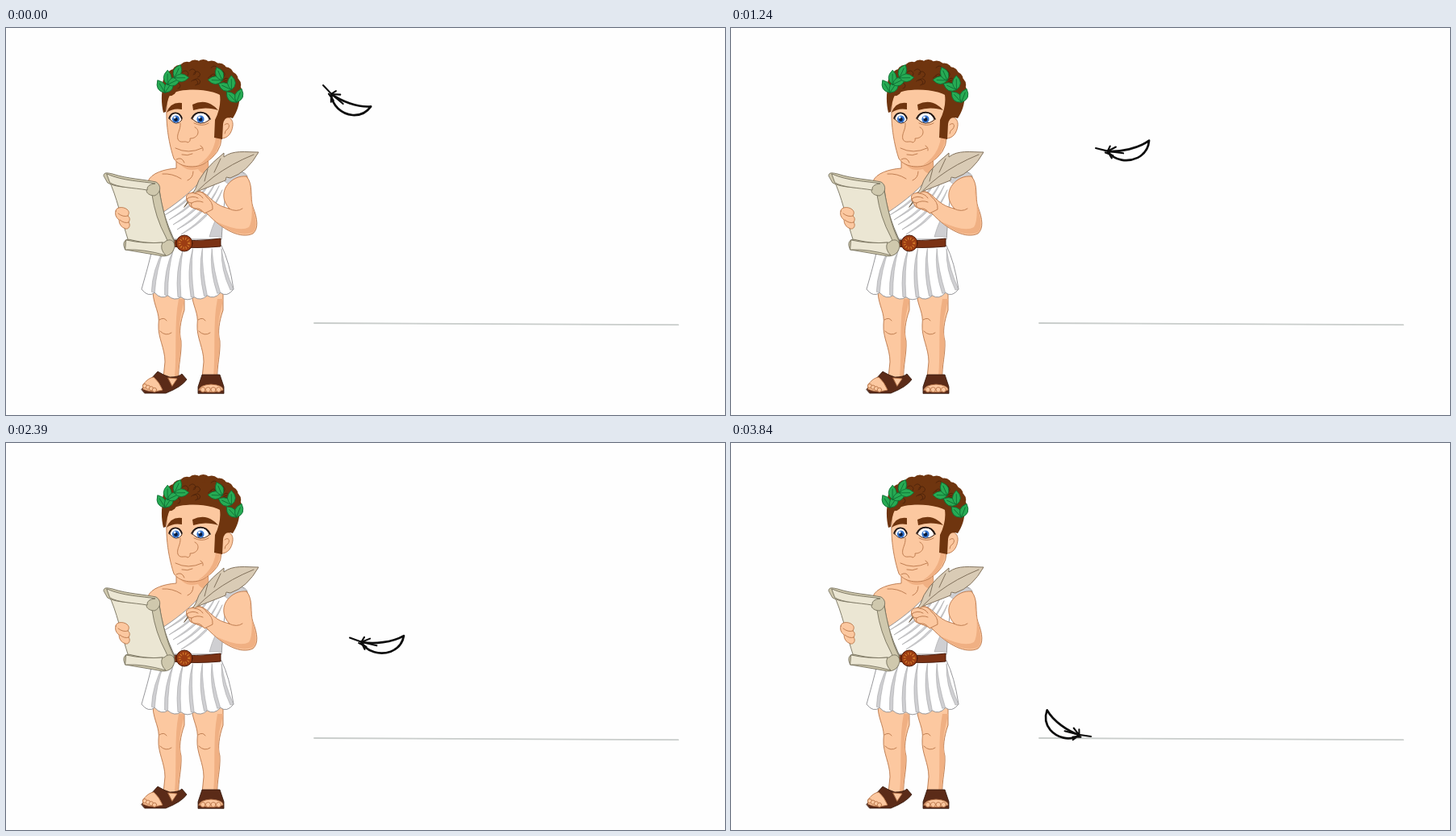
Recreate the animation shown at these times as an HTML page. Size 891 by 480 pixels, loop 3970 ms.

```html
<!DOCTYPE html>
<html lang="en">
<head>
<meta charset="utf-8">
<title>Falling feather</title>
<style>
  html, body { margin: 0; width: 100%; height: 100%; overflow: hidden; background: #fefefe; }
  svg { display: block; width: 100%; height: 100%; stroke-linejoin: round; stroke-linecap: round; }
  .skin { fill: #fcc8a0; stroke: #b9764a; stroke-width: .9; }
  .shade { fill: #f0b083; }
  .crease { fill: none; stroke: #b9764a; stroke-width: .9; }
  .cloth { fill: #fff; stroke: #8d8d90; stroke-width: .9; }
  .fold { fill: #cfcfd2; stroke: #98989b; stroke-width: .5; }
  .hair { fill: #6f350f; }
  .curl { fill: none; stroke: #4a210b; stroke-width: .8; }
  .leather { fill: #5b2b18; stroke: #32160b; stroke-width: .8; }
  .paper { fill: #ebe6d3; stroke: #77715d; stroke-width: .9; }
  .roll { fill: #cfc8ad; stroke: #77715d; stroke-width: .9; }
  .leaf { fill: #27ab54; stroke: #0d6a31; stroke-width: .8; }
  .quill { fill: #d9cbb5; stroke: #786752; stroke-width: .9; }
  #feather { fill: none; stroke: #0c0c0c; stroke-width: 2.7; }
</style>
</head>
<body>
<svg viewBox="0 0 891 480" preserveAspectRatio="none">
  <path d="M382 366 L833 368.2" stroke="#c9cdcb" stroke-width="1.8"/>

  <g id="leg">
    <path class="skin" d="M182 328 C183 345 191 353 189 368 C188 384 197 397 197 414 L195 434 H214 C213 420 218 404 217 388 C214 378 216 364 221 350 V328Z"/>
    <path class="shade" d="M214 336 H221 C218 354 213 365 216 383 C218 400 213 416 213 433 H209 C212 400 208 365 214 336Z"/>
    <path class="crease" d="M190 362 Q196 358 199 363 M191 376 Q198 383 205 378"/>
  </g>
  <use href="#leg" x="48"/>

  <g id="feet">
    <path class="leather" d="M168 448 L188 426 Q196 431 203 433 Q214 433 218 429 L224 436 Q218 445 198 453 H172Z"/>
    <path class="skin" d="M170 442 Q176 434 183 433 Q190 439 194 449 Q180 453 170 448Z M201 434 L212 435 L206 444Z"/>
    <path class="leather" d="M238 453 V445 L243 430 H265 L270 445 V453Z"/>
    <path class="skin" d="M239 449 Q240 443 254 442 Q269 443 269 449 Q254 454 239 449Z"/>
  </g>

  <g id="torso">
    <path class="skin" d="M211 155 V174 C196 175 180 180 176 190 C175 205 190 220 196 232 H235 L265 190 L251 177 L250 155Z"/>
    <path class="shade" d="M212 162 Q232 181 250 160 L251 179 Q243 183 238 175 Q220 180 212 162Z"/>
    <path class="crease" d="M194 181 Q206 180 217 187 M232 178 Q232 186 225 189"/>
    <path class="cloth" d="M250 179 C238 196 217 214 194 229 L208 262 H267 C269 237 269 209 277 197 Q284 188 299 188 C301 181 292 177 284 177 L258 175Z"/>
    <path class="fold" d="M283 178 Q298 177 298 187 Q287 187 276 194 L271 190Z M268 226 Q258 236 252 259 H267Z"/>
    <g id="skirt"></g>
    <path d="M205 263 Q236 265 266 261 V271 Q236 274 206 271Z" fill="#7b3214" stroke="#421708" stroke-width=".9"/>
    <circle cx="221" cy="267" r="10" fill="#9c3d13" stroke="#481806"/>
    <circle cx="221" cy="267" r="5.8" fill="none" stroke="#d6822e" stroke-width="3" stroke-dasharray="1 2.1" stroke-linecap="butt"/>
  </g>

  <g id="scroll">
    <path class="paper" d="M127 188 C137 207 143 238 152 265 L198 272 L209 265 Q193 230 190 200Z"/>
    <path class="roll" d="M181 207 L190 202 C194 224 199 247 208 264 Q209 278 202 281 C199 272 203 269 198 259 Q185 235 181 207Z"/>
    <path class="roll" d="M121 183 C121 178 127 180 132 181 C150 187 173 188 186 191 C193 195 192 205 184 208 C177 208 172 203 175 200 C159 197 137 199 126 192Z"/>
    <path class="paper" d="M125 181 C145 190 169 190 185 193 Q174 194 175 201 C157 198 139 198 129 192Z"/>
    <path class="roll" d="M146 270 C145 263 150 261 156 263 Q176 268 196 266 C202 260 209 263 209 271 C207 281 199 285 189 282 L148 275Z"/>
    <path class="paper" d="M149 263 Q172 268 194 266 Q190 274 198 282 Q171 274 148 275Z"/>
    <path class="skin" d="M136 227 C136 222 145 221 150 225 Q154 228 151 233 Q155 236 152 241 C155 245 152 250 148 249 Q140 246 140 238 Q134 233 136 227Z"/>
    <path class="crease" d="M139 230 Q145 235 151 233 M141 238 Q147 243 152 241"/>
  </g>

  <g id="head">
    <path class="skin" d="M267 114 C274 107 282 112 281 121 C280 130 275 137 267 137Z"/>
    <path class="crease" d="M271 120 C276 116 278 121 275 125 Q271 127 271 131"/>
    <path class="skin" d="M202 78 C196 100 199 135 208 162 C216 174 236 174 246 168 Q267 155 267 136 L268 74Z"/>
    <path class="shade" d="M266 136 H260 Q257 158 238 170 Q262 164 266 136Z"/>
    <g id="curls"></g>
    <path class="hair" d="M199 105 Q204 91 218 93 V101 Q207 99 199 105Z M231 95 Q249 86 263 102 Q247 97 232 102Z"/>
    <path d="M203 113 C205 103 215 103 218 114 Q211 123 203 113Z M231 113 C235 102 248 102 252 114 Q241 123 231 113Z" fill="#fff" stroke="#4a2a1c"/>
    <path d="M202 112 C205 103 215 103 218 112 M230 112 C235 102 248 102 253 113" fill="none" stroke="#1c1413" stroke-width="1.6"/>
    <g id="eye">
      <circle cx="210.5" cy="113" r="4.6" fill="#3472cc"/>
      <circle cx="210.5" cy="113.4" r="2.3" fill="#071a39"/>
      <circle cx="209" cy="111" r="1.4" fill="#fff"/>
    </g>
    <use href="#eye" x="30.5"/>
    <path class="crease" d="M216 118 C217 126 211 131 213 138 C216 144 222 139 225 142 Q229 141 228 137 C239 137 241 126 234 123 M210 149 Q226 157 243 149 M241 146 Q245 148 244 152 M218 157 Q225 159 231 156 M211 163 Q218 159 221 167 M233 118 Q243 123 251 118"/>
    <g id="wreath"></g>
  </g>

  <g id="arm">
    <path class="skin" d="M298 184 C307 194 302 210 306 222 C312 237 313 249 306 255 C291 262 269 251 249 230 L229 222 L224 214 C224 207 231 201 241 203 C252 206 256 220 277 224 C268 215 268 203 274 195 C280 187 289 183 298 184Z"/>
    <path class="shade" d="M302 196 Q302 214 307 226 Q313 250 305 254 Q285 260 260 240 Q290 254 301 247 Q308 236 302 196Z"/>
    <path class="crease" d="M276 224 Q286 229 293 224"/>
    <path class="quill" d="M221 222 L235 199 Q240 179 270 155 V160 C281 151 297 154 313 154 Q299 179 278 186 L273 185 L272 189 L239 202Z"/>
    <path class="quill" d="M221 222 Q250 180 307 157 M246 190 L250 175 M258 179 L266 162" style="fill:none"/>
    <path class="skin" d="M224 212 C221 207 228 203 234 205 C239 200 246 205 248 209 Q257 216 256 225 L246 230 Q241 223 235 224 Q228 223 230 217 Q225 217 224 212Z"/>
    <path class="crease" d="M230 217 Q237 213 244 216 M234 205 Q241 206 244 211 M224 212 Q231 207 238 211"/>
  </g>

  <g id="feather">
    <path d="M14 6 C21 19 37 23 50 19 Q64 14 67 0 C52 8 30 9 14 6Z"/>
    <path d="M0 0 L15 6 L33 11 M18 0 L14 6 L25 2 M11 7 L20 12 M14 6 L18 15" stroke-width="2.1"/>
  </g>
</svg>
<script>
  const el = id => document.getElementById(id);
  const mix = (a, b, u) => a + (b - a) * u;
  const times = (n, f) => Array.from({ length: n }, (_, i) => f(i)).join("");
  let seed = 7;
  const random = () => (seed = seed * 16807 % 2147483647) / 2147483647;

  // Cloth: scalloped hem, pleats and folds across the chest
  const LOBES = 7;
  const hem = u => `${mix(168, 282, u)} ${324 + 10 * Math.sin(Math.PI * u)}`;
  const lobes = times(LOBES, i => {
    const mid = 338 + 7 * Math.sin(Math.PI * (i + .5) / LOBES) - 5;
    return `Q${mix(168, 282, (i + .5) / LOBES)} ${mid} ${hem((i + 1) / LOBES)}`;
  });
  const pleats = times(LOBES, i => {
    const u = (i + 1) / LOBES, x = mix(184, 267, u);
    return `<path class="fold" d="M${x} 274 Q${x + 16 * u - 12} 300 ${hem(u)}
      L${hem(u - .035)} Q${x + 16 * u - 17} 300 ${x} 274Z"/>`;
  });
  const folds = times(5, i => `<path class="fold" d="M${252 + 4 * i} ${181 + 5 * i}
    Q${234 + 5 * i} ${208 + 6 * i} ${197 + 5 * i} ${232 + 6 * i}
    Q${236 + 5 * i} ${212 + 6 * i} ${252 + 4 * i} ${181 + 5 * i}Z"/>`);
  el("skirt").innerHTML = folds +
    `<path class="cloth" d="M182 272 Q175 300 ${hem(0)} ${lobes} Q277 290 267 270Z"/>` + pleats;

  // Toes
  el("feet").innerHTML += times(4, i =>
    `<circle class="skin" cx="${172 + 4 * i}" cy="${444 + 1.6 * i}" r="2.6"/>
     <circle class="skin" cx="${244 + 6.5 * i}" cy="448.5" r="3"/>`);

  // Hair: round locks around the crown, loose curls inside
  const locks = times(13, i => {
    const a = Math.PI * (1.02 + i / 12);
    return `<circle class="hair" cx="${242 + 40 * Math.cos(a)}" cy="${76 + 27 * Math.sin(a)}" r="10"/>`;
  });
  const curls = times(18, () => `<path class="curl"
    d="M${208 + 66 * random()} ${48 + 24 * random()} q5 -5 8 1 q0 4 -3 4"/>`);
  el("curls").innerHTML = locks + `<path class="hair" d="M195 105 C191 88 192 66 205 56
    C225 44 262 45 282 62 C294 80 290 98 281 112 Q271 108 269 119 L268 138 L258 136
    L259 114 Q267 98 265 83 C250 75 215 74 203 83 Q199 92 198 104Z"/>` + curls;

  // Wreath: leaf pairs growing along a curved twig
  function twig(x0, y0, x1, y1, x2, y2) {
    return times(3, i => {
      const u = .05 + i * .31;
      const at = (a, b, c) => mix(mix(a, b, u), mix(b, c, u), u);
      const slope = (a, b, c) => mix(b - a, c - b, u);
      const turn = Math.atan2(slope(y0, y1, y2), slope(x0, x1, x2)) * 180 / Math.PI;
      return [-32, 32].map(side => `<path class="leaf"
        transform="translate(${at(x0, x1, x2)} ${at(y0, y1, y2)}) rotate(${turn + side})"
        d="M0 0 Q8 -10 18 0 Q8 10 0 0 H13"/>`).join("");
    });
  }
  el("wreath").innerHTML = twig(197, 82, 196, 64, 224, 55) + twig(286, 95, 282, 66, 250, 57);

  // Feather keys: ms, quill x, quill y, angle
  const LOOP = 3970;
  const keys = [
    [0, 393, 71, 24], [330, 451, 96, 6], [660, 445, 100, 15],
    [1120, 389, 129, 14], [1240, 452, 149, -8], [1600, 401, 186, 3], [1730, 431, 196, -8],
    [2190, 426, 233, -4], [2520, 426, 250, 0], [2850, 436, 267, -2],
    [3310, 465, 309, 105], [3640, 461, 346, 185], [3840, 446, 364, 211]
  ];

  // Rest on each key, then move on in steps; the wide swing has quick steps.
  function poseAt(now) {
    const i = keys.findLastIndex(k => k[0] <= now);
    const from = keys[i], to = keys[i + 1] || from;
    const quick = from[0] >= 1120 && from[0] < 1600;
    const hold = quick ? 60 : 200, step = quick ? 60 : 130;
    const count = Math.max(1, Math.round((to[0] - from[0] - hold) / step) + 1);
    const done = Math.max(0, Math.floor((now - from[0] - hold) / step) + 1);
    return from.map((v, n) => mix(v, to[n], Math.min(1, done / count)));
  }

  function frame() {
    const [, x, y, angle] = poseAt(performance.now() % LOOP);
    const length = 1 - .2 * Math.sin(angle * Math.PI / 180) ** 2;  // foreshortened when upright
    const side = angle > 60 ? -1 : 1;
    el("feather").setAttribute("transform",
      `translate(${x} ${y}) rotate(${angle}) scale(${length} ${side})`);
    requestAnimationFrame(frame);
  }
  frame();
</script>
</body>
</html>
```
